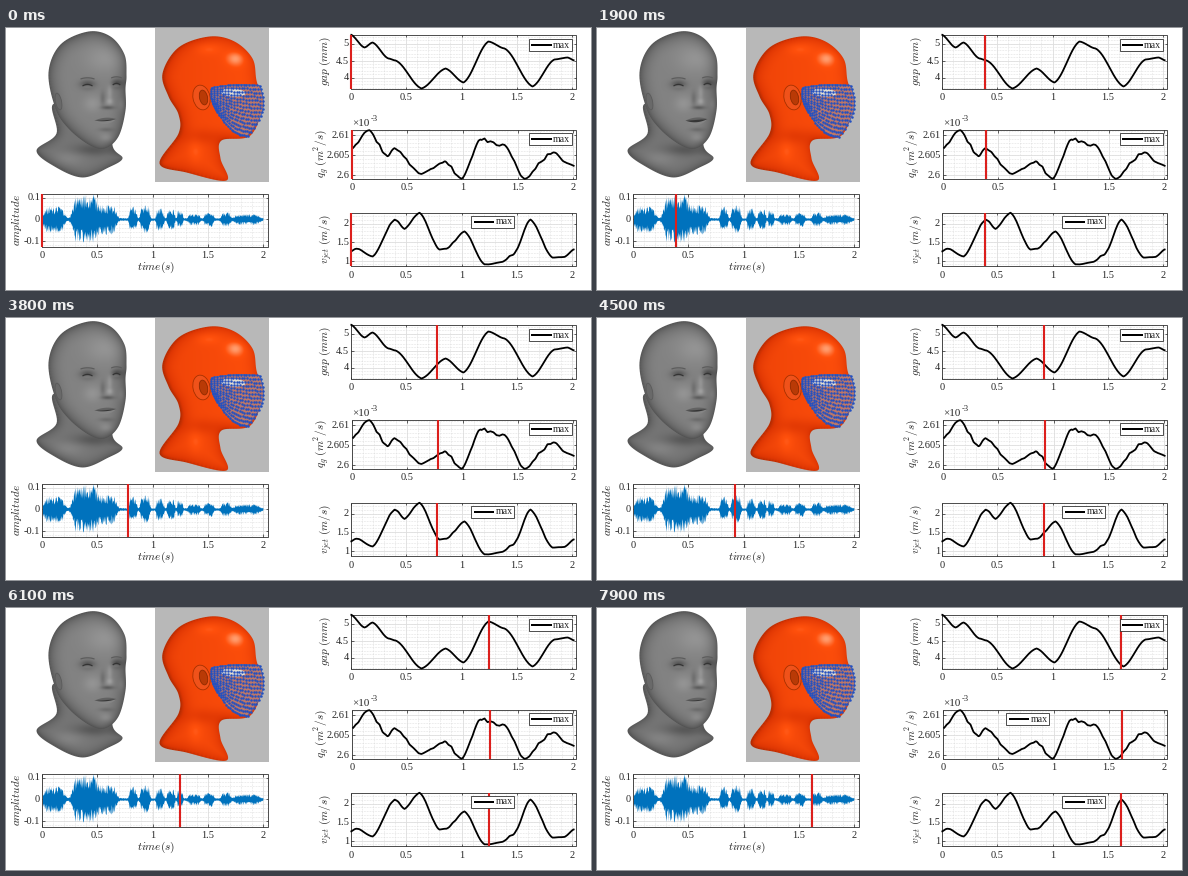
Recreate the animation shown at these times as a matplotlib script. Size 585 px wide and 262 px high, loop 8 s.

```python
import numpy as np
import matplotlib.pyplot as plt
from matplotlib.animation import FuncAnimation
from matplotlib.collections import LineCollection
from matplotlib.patches import Ellipse, Polygon, Rectangle

W, H, DPI = 585, 262, 100
FRAMES, INTERVAL = 80, 100
PX = 72 / DPI                 # points per pixel
STEP = 2.262                  # cursor pixels per frame
HALF_SECOND = 55.25           # pixels
RED, BLUE, INK = "#dc1f1c", "#0072bd", "#262626"

plt.rcParams["font.family"] = "Liberation Serif"
plt.rcParams["mathtext.fontset"] = "cm"

fig = plt.figure(figsize=(W / 100, H / 100), dpi=DPI, facecolor="white")
ax = fig.add_axes([0, 0, 1, 1])
ax.axis("off")
rng = np.random.default_rng(4)


def text(x, y, s, size=10.4, **kw):
    kw = {"ha": "center", "va": "center", "color": INK, **kw}
    return ax.text(x, y, s, fontsize=size * PX, **kw)


def line(x, y, color="black", width=1.0, z=5):
    return ax.plot(x, y, color=color, lw=width * PX, zorder=z,
                   solid_capstyle="butt", solid_joinstyle="round")[0]


def lines(segments, color, width, z, style="solid"):
    ax.add_collection(LineCollection(segments, colors=color, lw=width * PX,
                                     linestyles=style, zorder=z))


def oval(x, y, w, h, tilt, color, edge="none", z=4):
    ax.add_patch(Ellipse((x, y), w, h, angle=tilt, fc=color, ec=edge,
                         lw=0.8 * PX, zorder=z))


def smooth(pts, n=12):
    """Closed Catmull-Rom curve through pts."""
    p = np.array(pts, float)
    a, c, d = np.roll(p, 1, 0), np.roll(p, -1, 0), np.roll(p, -2, 0)
    t = (np.arange(n) / n)[None, :, None]
    a, p, c, d = (q[:, None, :] for q in (a, p, c, d))
    out = 0.5 * (2 * p + (c - a) * t + (2 * a - 5 * p + 4 * c - d) * t**2
                 + (3 * p - a - 3 * c + d) * t**3)
    return out.reshape(-1, 2)


def solid(pts, colors, spots, edge, gain, radius, z, tilt=0.0):
    """Fill an outline with dome shading plus soft light and dark spots."""
    poly = smooth(pts)
    (x0, y0), (x1, y1) = poly.min(0) - 1, poly.max(0) + 1
    x, y = np.meshgrid(np.arange(x0, x1, 0.5), np.arange(y0, y1, 0.5))
    dist = np.full(x.shape, 1e9)
    for px, py in poly:
        np.minimum(dist, (x - px) ** 2 + (y - py) ** 2, out=dist)
    depth = 1 - np.minimum(np.sqrt(dist) / radius, 1)
    s = edge + gain * np.sqrt(1 - depth**2)
    s += tilt * (2 * (x - x0) / (x1 - x0) - 1)
    for cx, cy, sx, sy, amp in spots:
        s += amp * np.exp(-((x - cx) / sx) ** 2 - ((y - cy) / sy) ** 2)
    stops = np.linspace(0, 1, len(colors))
    rgb = np.stack([np.interp(s, stops, ch) for ch in zip(*colors)], -1) / 255
    im = ax.imshow(rgb, extent=(x0, x1, y1, y0), aspect="auto",
                   interpolation="bilinear", zorder=z)
    im.set_clip_path(Polygon(poly, transform=ax.transData))


# ---- talking head -------------------------------------------------------
GRAYS = [(44, 44, 44), (190, 190, 190)]
NECK = [(48, 75), (50, 105), (30, 122), (48, 138), (76, 149), (102, 139),
        (116, 130), (107, 120), (98, 95)]
HEAD = [(82, 3), (54, 16), (42, 44), (49, 80), (62, 100), (82, 116),
        (98, 120), (112, 108), (119, 82), (119, 60), (120, 47), (118, 26),
        (104, 8)]
EYES = [(81, 57.5, 5), (110, 56.5, 3.8)]      # x, y, half width

face = [(98, 30, 20, 14, 0.12), (86, 75, 9, 8, 0.12), (115, 76, 3, 6, 0.08),
        (103, 64, 2.5, 9, 0.14), (103, 73, 3.5, 3, 0.16),
        (96, 70, 2.5, 7, -0.15), (101, 79, 6, 1.8, -0.28),
        (99, 101, 7, 2, -0.14), (100, 109, 6, 4, 0.12)]
for ex, ey, r in EYES:
    face += [(ex, ey - 1.5, 1.5 * r, 4.5, -0.32), (ex, ey + 0.5, r, 1.6, 0.2)]
solid(NECK, GRAYS, [(86, 122, 22, 6, -0.2), (62, 130, 16, 8, 0.1)],
      0.2, 0.3, 13, 2)
solid(HEAD, GRAYS, face, 0.17, 0.42, 20, 3)
oval(52, 73, 6, 17, -12, "#696969", "#5a5a5a")
for ex, ey, r in EYES:
    u = np.linspace(-1, 1, 15)
    line(ex + r * u, ey - 1.6 * (1 - u**2), "#333333", 1.2, 4)
    line(ex + 1.4 * r * u, ey - 7 - 1.2 * (1 - u**2), "#5c5c5c", 1.2, 4)

upper = ax.add_patch(Polygon([(0, 0)], fc="#626262", zorder=5))
lower = ax.add_patch(Polygon([(0, 0)], fc="#858585", zorder=5))
gape = ax.add_patch(Polygon([(0, 0)], fc="#363636", zorder=6))


def mouth(gap):
    u = np.linspace(-1, 1, 25)
    x, arc = 99 + 11 * u, 1 - u**2
    mid = 92 - 0.8 * u - 0.7 * u**2
    top, low = mid - (0.3 + 0.3 * gap) * arc, mid + (0.4 + 1.4 * gap) * arc

    def band(a, b):
        return np.r_[np.c_[x, a], np.c_[x, b][::-1]]
    upper.set_xy(band(top - 2.4 * arc, mid))
    lower.set_xy(band(mid, low + 3 * arc))
    gape.set_xy(band(top, low))


# ---- masked head --------------------------------------------------------
ax.add_patch(Rectangle((148, -1), 114, 154.5, fc="#b8b8b8", zorder=1))
ORANGES = [(128, 30, 0), (222, 54, 3), (255, 80, 12), (255, 200, 165)]
BUST = [(203, 8), (172, 19), (156, 45), (162, 68), (172, 86), (172, 105),
        (153, 135), (180, 144), (220, 152), (214, 130), (215, 112),
        (244, 107), (256, 76), (250, 52), (246, 30), (228, 13)]
solid(BUST, ORANGES, [(228, 30, 9, 7, 0.28), (200, 20, 13, 6, 0.14),
                      (196, 108, 18, 8, -0.18), (188, 122, 7, 12, 0.14)],
      0.16, 0.42, 19, 2, tilt=0.08)
oval(195, 69, 17, 25, -12, "#f0521a", "#a43000", 3)
oval(197, 69, 8, 15, -12, "#b93a06", "#8c2a00", 3)

cloth = ax.add_patch(Polygon([(0, 0)], fc="#bd7766", ec="#3f62b4",
                             lw=0.8 * PX, zorder=4))
oval(226, 64, 26, 8, 4, "#e0dcd2", z=4.5)
U, V = np.meshgrid(np.linspace(0, 1, 19), np.linspace(0, 1, 14))
dots = ax.scatter(U, V, s=(2.5 * PX) ** 2, c="#2450c0", lw=0, zorder=5)


def mask_xy(u, v, gap):
    """Mesh point: u runs from ear to nose, v from top to bottom."""
    bulge = np.sin(np.pi * v)
    x0, y0 = 205 + 4 * v - 2 * bulge, 59 + 22 * v
    x1, y1 = 253 - 12 * v**2 + 6 * bulge, 57 + 50 * v
    y = y0 + (y1 - y0) * u + 9 * (v - 0.2) * np.sin(np.pi * u)
    return np.stack([x0 + (x1 - x0) * u, y + 1.2 * gap * u * v**2], -1)


def mask(gap):
    k = np.linspace(0, 1, 20)
    u, v = np.r_[k, 0 * k + 1, k[::-1], 0 * k], np.r_[0 * k, k, 0 * k + 1, k[::-1]]
    cloth.set_xy(mask_xy(u, v, gap))
    dots.set_offsets(mask_xy(U, V, gap).reshape(-1, 2))


# ---- charts -------------------------------------------------------------
def chart(x0, x1, y0, y1, top, dy, names, minor, label, lx):
    """Box, grids, ticks, labels and cursor; names run down from y = top."""
    xs = x0 + HALF_SECOND * np.arange(5)
    ys = top + dy * np.arange(len(names))
    fine_y = top + minor * np.arange(-30, 40)
    fine_y = fine_y[(fine_y > y0) & (fine_y < y1)]

    def grid(gx, gy):
        return ([[(x, y0), (x, y1)] for x in gx]
                + [[(x0, y), (x1, y)] for y in gy])
    lines(grid(np.arange(x0, x1, HALF_SECOND / 5), fine_y), "#cfcfcf", 0.6, 2,
          (0, (1, 1.6)))
    lines(grid(xs, ys), "#dedede", 0.8, 2)
    ticks = [[(x, y), (x, y + d)] for x in xs for y, d in ((y0, 2.5), (y1, -2.5))]
    ticks += [[(x, y), (x + d, y)] for y in ys for x, d in ((x0, 2.5), (x1, -2.5))]
    lines(ticks, INK, 0.7, 4)
    ax.add_patch(Rectangle((x0, y0), x1 - x0, y1 - y0, fc="none", ec=INK,
                           lw=0.8 * PX, zorder=4))
    for i, x in enumerate(xs):
        text(x, y1 + 9, f"{i / 2:g}")
    for y, s in zip(ys, names):
        text(x0 - 2, y + 0.5, s, ha="right")
    text(lx, (y0 + y1) / 2 - 0.5, label, 11.3, rotation=90)
    return line([x0, x0], [y0, y1], RED, 2.1, 7)


def legend(x, y):
    box = ax.add_patch(Rectangle((x, y), 43, 11.5, fc="white", ec=INK,
                                 lw=0.8 * PX, zorder=8))
    key = line([x + 2.5, x + 23], [y + 6, y + 6], "black", 2, 9)
    name = text(x + 33, y + 6, "max", 10, zorder=9)

    def move(nx):
        box.set_x(nx)
        key.set_xdata([nx + 2.5, nx + 23])
        name.set_x(nx + 33)
    return move


def curve(keys, rough=0.0):
    """Cosine-eased line through its turning points, with optional jitter."""
    kx, ky = np.array(keys, float).T
    x = np.arange(kx[0], kx[-1] + 0.1, 1)
    i = np.clip(np.searchsorted(kx, x, "right") - 1, 0, len(kx) - 2)
    t = (x - kx[i]) / (kx[i + 1] - kx[i])
    # Part linear, so that long slopes stay fairly straight.
    t = 0.35 * t + 0.65 * (1 - np.cos(np.pi * t)) / 2
    y = ky[i] + (ky[i + 1] - ky[i]) * t
    wobble = np.interp(x, x[::3], rng.normal(0, 1, x[::3].size))
    line(x, y + rough * wobble, "black", 1.8, 6)


cursors = [
    chart(35.5, 261.5, 165.5, 218, 169, 21.7, ("0.1", "0", "-0.1"), 4.35,
          "$amplitude$", 11),
    chart(344.5, 569.5, 6, 60.5, 15, 17, ("5", "4.5", "4"), 3.4,
          "$gap\\ (mm)$", 319),
    chart(345.5, 569.5, 101.5, 150.5, 106, 20, ("2.61", "2.605", "2.6"), 4,
          "$q_g\\ (m^2/s)$", 315),
    chart(344.5, 569.5, 184, 237.5, 195, 18.5, ("2", "1.5", "1"), 3.7,
          "$v_{jet}\\ (m/s)$", 319),
]
starts = [c.get_xdata()[0] for c in cursors]
text(149.5, 239, "$time(s)$", 11.3)
text(345.5, 94.5, "×10", 11, ha="left")
text(364.5, 90.5, "-3", 8.5, ha="left")

curve([(344, 6), (358, 19), (366, 14), (382, 30), (389, 32), (415, 60),
       (439, 40), (457, 54), (482, 13), (498, 20), (526, 58), (548, 31),
       (561, 29), (568, 32)])
curve([(346, 119), (363, 102), (381, 128), (388, 121), (415, 145), (438, 133),
       (455, 150), (474, 111), (498, 116), (518, 150), (547, 123), (560, 135),
       (568, 137)], rough=0.9)
curve([(344, 223), (350, 220), (366, 228), (388, 191), (398, 200), (413, 184),
       (433, 221), (440, 220), (458, 203), (478, 236), (494, 234), (507, 226),
       (524, 191), (546, 229), (558, 228), (568, 221)], rough=0.25)

legend(522, 10.5)
move_flow = legend(522, 104.5)
legend(464.5, 187.5)

# Speech: seeded noise under one flat-topped pulse per syllable.
SYLLABLES = [(47, 11, 12), (77, 12, 24), (98, 12, 14), (126, 4, 12),
             (138, 5, 13), (153, 4, 10), (164, 4, 9), (173, 3, 8),
             (187, 6, 5), (202, 5, 6), (219, 5, 6), (240, 13, 4)]
wx = np.arange(36, 256.5, 0.4)
loud = 1.2 + sum(h * np.exp(-((wx - c) / w) ** 6) for c, w, h in SYLLABLES)
up, down = 0.3 + loud * rng.uniform(0.35, 1, (2, wx.size))
ax.fill_between(wx, 190.5 - up, 190.5 + down, color=BLUE, lw=0, zorder=5)
window = np.hanning(25)
speech = np.convolve(loud, window / window.sum(), "same") / loud.max()

ax.set_xlim(-0.5, W - 0.5)
ax.set_ylim(H - 0.5, -0.5)


def update(i):
    gap = np.interp(36 + i * STEP, wx, speech)
    mouth(gap)
    mask(gap)
    for c, x in zip(cursors, starts):
        c.set_xdata([x + i * STEP] * 2)
    # The legend steps aside when the cursor reaches it.
    move_flow(408.5 if starts[2] + i * STEP > 521 else 522)
    return []


anim = FuncAnimation(fig, update, frames=FRAMES, interval=INTERVAL,
                     repeat=True, repeat_delay=0, blit=False)
plt.show()
```
